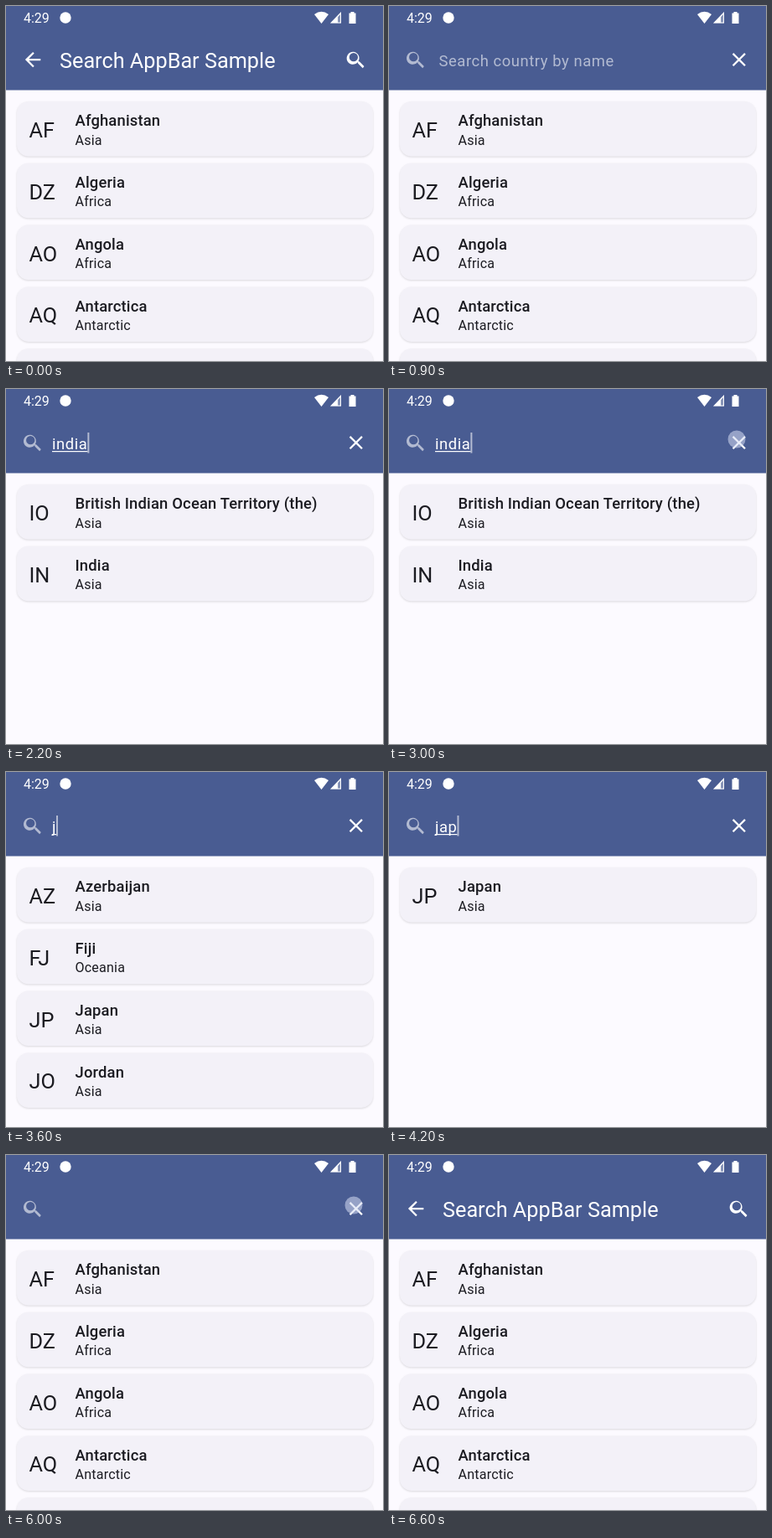
Animation, 450 px wide and 424 px high, one loop 6.7 s. Source, as an HTML page:

```html
<!DOCTYPE html>
<html lang="en">
<head>
<meta charset="utf-8">
<title>Search AppBar Sample</title>
<style>
  html, body { margin: 0; height: 100%; overflow: hidden; background: #fcfaff; }
  svg { display: block; width: 100vw; height: 100vh; font-family: Roboto, sans-serif; }
  .code, .title { font-size: 25.25px; }
  .name { font-size: 18.4px; font-weight: 500; letter-spacing: .17px; }
  .region { font-size: 16.07px; letter-spacing: .2px; }
  .field { font-size: 18.4px; letter-spacing: .574px; }
  .card { fill: #f3f1f8; filter: drop-shadow(0 1px 1px #0002); }
  #list { fill: #1b1b21; }
  #bar { fill: #fff; }
  .dim { opacity: .58; }
</style>
</head>
<body>
<svg viewBox="0 0 450 424">
  <rect width="450" height="424" fill="#fcfaff"/>
  <g id="list"></g>
  <rect width="450" height="100.5" fill="#495c92"/>
  <g fill="#fff">
    <text x="21" y="20" font-size="16">4:29</text>
    <circle cx="71" cy="14" r="6.7"/>
    <path d="M368 10Q376.500 3.500 385 10L376.500 21Z"/>
    <path d="M400 7V20.500H387Z" opacity=".35"/>
    <path d="M400 7V20.500H387ZM399 10L396 13V19.500H399Z" fill-rule="evenodd"/>
    <path d="M409.500 8.500H411.500V7H415.500V8.500H417.500V21H409.500Z"/>
  </g>
  <g id="bar"></g>
  <circle id="touch" r="10.500" fill="#d5dcf3"/>
</svg>
<script>
const LOOP = 6700;
const countries = `AF,Afghanistan,Asia
DZ,Algeria,Africa
AO,Angola,Africa
AQ,Antarctica,Antarctic
AR,Argentina,Americas
AM,Armenia,Asia
AZ,Azerbaijan,Asia
BH,Bahrain,Asia
IO,British Indian Ocean Territory (the),Asia
CN,China,Asia
FJ,Fiji,Oceania
IN,India,Asia
ID,Indonesia,Asia
JP,Japan,Asia
JO,Jordan,Asia`.split('\n').map(line => line.split(','));

// [time, query]; null is the title bar, false the unfocused field
const steps = [
  [0, null], [500, false], [1100, ''],
  [1300, 'i'], [1400, 'in'], [1500, 'ind'], [1800, 'indi'], [2000, 'india'],
  [3100, ''], [3600, 'j'], [3900, 'ja'], [4100, 'jap'], [4400, 'japa'], [4800, 'japan'],
  [5400, ''], [6200, null]
];
// [start, end, x, y]
const taps = [[300, 600, 415, 60], [2900, 3200, 415, 60], [5300, 5600, 415, 60], [6000, 6300, 415, 60]];

const icons = {
  search: 'M15.5 14h-.79l-.28-.27A6.5 6.5 0 1 0 13.73 14.71l.27.28v.79l5 4.99L20.490 19zM9.500 14a4.500 4.500 0 1 1 0-9a4.500 4.500 0 0 1 0 9z',
  back: 'M20 11H7.830l5.590-5.590L12 4l-8 8 8 8 1.410-1.410L7.830 13H20z',
  close: 'M19 6.410L17.590 5 12 10.590 6.410 5 5 6.410 10.590 12 5 17.590 6.410 19 12 13.410 17.590 19 19 17.590 13.410 12z'
};
const $ = id => document.getElementById(id);
const icon = (name, x, cls = '') =>
  `<path class="${cls}" transform="translate(${x} 50.300) scale(1.148)" d="${icons[name]}"/>`;
const text = (cls, x, y, str) => `<text class="${cls}" x="${x}" y="${y}">${str}</text>`;

function card([code, name, region], i) {
  return `<g transform="translate(0 ${i * 73.8})">
    <rect class="card" x="13" y="114" width="425" height="65.500" rx="13.800"/>
    ${text('code', 27.5, 157, code)}${text('name', 82.5, 143.3, name)}${text('region', 82.5, 165.7, region)}</g>`;
}

function appBar(query) {
  if (query === null)
    return icon('back', 18.3) + text('title', 64, 74, 'Search AppBar Sample') + icon('search', 404);
  const content = query === false
    ? text('field dim', 59.5, 71.5, 'Search country by name')
    : text('field', 55, 71.5, query) +
      '<rect id="line" x="55" y="74" height="1.200"/><rect id="caret" class="dim" y="52" width="2" height="24.500"/>';
  return icon('search', 18.3, 'dim') + content + icon('close', 404);
}

let shown;
function show(step) {
  const query = step[1];
  $('bar').innerHTML = appBar(query);
  $('list').innerHTML = countries
    .filter(c => c[1].toLowerCase().includes(query || ''))
    .slice(0, 5).map(card).join('');
  if ($('caret')) {
    const width = query ? document.querySelector('.field').getComputedTextLength() : 0;
    $('line').setAttribute('width', width);
    $('caret').setAttribute('x', 55 + width);
  }
  shown = step;
}

function draw() {
  const t = performance.now() % LOOP;
  const step = steps.findLast(s => s[0] <= t);
  if (step !== shown) show(step);
  if ($('caret')) $('caret').style.visibility = (t - step[0]) % 1000 < 500 ? 'visible' : 'hidden';

  const tap = taps.find(([start, end]) => t >= start && t < end);
  $('touch').setAttribute('opacity', tap ? .55 : 0);
  if (tap) $('touch').setAttribute('transform', `translate(${tap[2]} ${tap[3]})`);
  requestAnimationFrame(draw);
}
draw();
</script>
</body>
</html>
```
